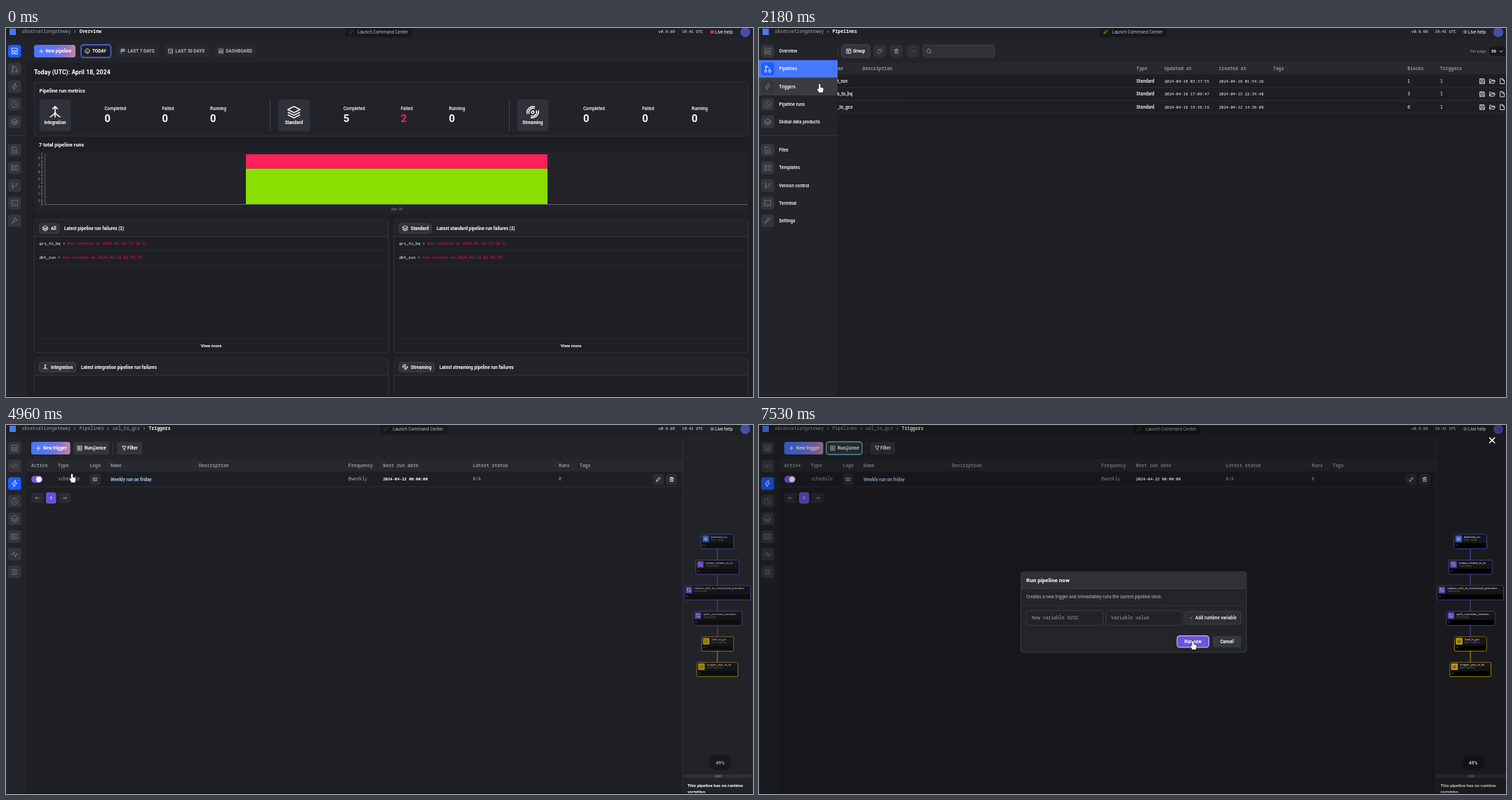
Animation, 1065 px wide and 526 px high, one loop 8 s. Source, as an HTML page with a canvas:

```html
<!DOCTYPE html>
<html lang="en">
<head>
<meta charset="utf-8">
<title>Pipeline dashboard</title>
<style>
html, body { margin: 0; width: 100%; height: 100%; overflow: hidden; background: #1e1f24; }
canvas { display: block; width: 1065px; height: 526px; }
</style>
</head>
<body>
<canvas id="stage" width="1065" height="526"></canvas>
<script>
const ctx = document.getElementById('stage').getContext('2d');
const LOOP = 8000;
const SANS = 'Roboto, "Open Sans", sans-serif';
const MONO = '"Noto Sans Mono", "DejaVu Sans Mono", monospace';
const BODY = '#1e1f24', PANEL = '#232429', BTN = '#33353a', SOFT = '#2a2c31', EDGE = '#35373d';
const BLUE = '#4877ff', PURPLE = '#6b50d7', GREEN = '#8ade00', RED = '#ff1f5a', YELLOW = '#ffcc19';
const WHITE = '#fff', GREY = '#a3a6ad', DIM = '#72757c';

const ICONS = {
  overview: 'M2 2h12v5H2zM2 9.5h4.5V14H2zM9 9.5h5V14H9z',
  pipes: 'M3 1.5h4v4H3zM2 11h4v4H2zM10.5 11h4v4h-4zM4.5 5.5V11M7 4q5.500 0 5.500 7',
  bolt: 'M10 1L3 9h4l-1 6 7-8H9z',
  clock: 'M8 1.500a6.500 6.500 0 1 0 .01 0M8 4v4.500l3 1.500',
  cube: 'M8 1.500l6 3.500v6l-6 3.500-6-3.500V5zM2 5l6 3.500L14 5M2 11l6-2.500 6 2.500M8 8.500v6',
  doc: 'M3 1.500h7l3 3v10H3zM5.500 8h5M5.500 11h5',
  tmpl: 'M1.500 2.500h5v4h-5zM1.500 9.500h5v4h-5zM10 2.500h4v11h-4z',
  branch: 'M4 2v12M2 12l2 2 2-2M4 10h6q2 0 2-2V4M10 5.500l2-2 2 2',
  term: 'M1.500 2.500h13v11h-13zM4 6l2.500 2L4 10M8 10.500h3',
  wrench: 'M13.500 4.500a4 4 0 0 1-5.500 4l-4.500 5L2 12l5-4.500a4 4 0 0 1 4-5.500L9.500 4.500l2 2z',
  code: 'M5 4L1 8l4 4M11 4l4 4-4 4M9.500 3l-3 10',
  ball: 'M8 1.500a6.500 6.500 0 1 0 .01 0M2 6.500q6 4 12 1M3 11q5-1 9 2',
  log: 'M1.500 3h13v10h-13zM5.500 3v10M8 6.500h4M8 9.500h4M3 6h1M3 9h1',
  pulse: 'M1 9h3l2-6 3.500 11L12 7l1 2h2',
  sliders: 'M1.500 3.500h13M1.500 8h13M1.500 12.500h13M5 2v3M11 6.500v3M6 11v3',
  smile: 'M8 1.500a6.500 6.500 0 1 0 .01 0M5 9.500q3 3 6 0M5.500 6v1M10.500 6v1',
  flag: 'M3 15V2h10v7H3M6 2v7M10 2v7M3 5.500h10',
  month: 'M2 2h12v12H2zM2 6h12M7 11h7',
  merge: 'M8 14V1.500M5 4.500l3-3 3 3M8 8Q7 11 2 13.500M8 8q1 3 6 5.500',
  layers: 'M8 1.500L15 5 8 8.500 1 5zM1 8l7 3.500L15 8M1 11l7 3.500 7-3.500',
  stream: 'M8 6.500a1.500 1.500 0 1 0 .01 0M4 10a4.500 4.500 0 0 1 6-6M12 6a4.500 4.500 0 0 1-6 6M1.500 10a7 7 0 0 1 9-8M14.500 6a7 7 0 0 1-9 8',
  plus: 'M8 2v12M2 8h12',
  filter: 'M2 2.500h12l-4.500 5.500v5.500l-3-2V8z',
  group: 'M2 2h12v12H2zM2 6h12M7 6v8',
  copy: 'M2 5h8v9H2zM6 5V2h8v8h-4',
  trash: 'M2 4h12M4 4v10h8V4M6 4V2h4v2M6.700 7v4M9.300 7v4',
  dots: 'M2 8h1.500M7.300 8h1.500M12.500 8H14',
  search: 'M7 2a5 5 0 1 0 .01 0M10.500 10.500L14 14',
  save: 'M2 2h10l2 2v10H2zM5 2v4h6V2M4.500 14V9.500h7V14',
  folder: 'M1.500 13V3h4l2 2h6v2.500M1.500 13l3-5.500h11l-3 5.500z',
  page: 'M3 1.500h6l4.500 4.500v8.500H3zM9 1.500V6h4.500',
  left: 'M14 8H2M6 4L2 8l4 4', right: 'M2 8h12M10 4l4 4-4 4',
  down: 'M3 6l5 5 5-5', chev: 'M6 3l5 5-5 5',
  pause: 'M5 2v12M11 2v12',
  edit: 'M2.500 13.500l1-4 7-7 3 3-7 7z',
  run: 'M2 2h12v12H2zM6 5v6l5-3z',
  block: 'M3 3h10v10H3zM1.500 3h3M11.500 13h3M3 1.500v3M13 11.500v3',
  rocket: 'M2.500 13.500l2.500-6q3-6 9-5.500 0 6-5.500 9zM5 8l3 3',
  cross: 'M2 2l12 12M14 2L2 14'
};
const HAND = new Path2D('M-1.2 .9a1.200 1.200 0 0 1 2.400 0V4.600l3 .6q1.300.3 1.200 1.600l-.5 3.200-.6 2h-5L-3.400 7.600q-.6-1.200.8-1.200l1.400 1z');
const ARROW = new Path2D('M0 0v9l2-1.800 1.400 3 1.500-.7-1.400-2.900H6.300z');
for (const k in ICONS) ICONS[k] = new Path2D(ICONS[k]);

function box(x, y, w, h, r, fill, stroke, lw = 0.9) {
  ctx.beginPath();
  ctx.roundRect(x, y, w, h, r);
  if (fill) { ctx.fillStyle = fill; ctx.fill(); }
  if (stroke) { ctx.strokeStyle = stroke; ctx.lineWidth = lw; ctx.stroke(); }
}
function line(x1, y1, x2, y2, color = EDGE, lw = 0.9) {
  ctx.strokeStyle = color; ctx.lineWidth = lw;
  ctx.beginPath(); ctx.moveTo(x1, y1); ctx.lineTo(x2, y2); ctx.stroke();
}
function dot(x, y, r, color) {
  ctx.fillStyle = color;
  ctx.beginPath(); ctx.arc(x, y, r, 0, 7); ctx.fill();
}
// y is the middle of the capitals; the tenfold font keeps small advances precise
function text(s, x, y, size = 6.35, color = WHITE, weight = 700, align = 'left', font = SANS) {
  ctx.save();
  ctx.translate(x, y + size * 0.36);
  ctx.scale(0.1, 0.1);
  ctx.font = `${weight} ${size * 10}px ${font}`;
  ctx.textAlign = align; ctx.fillStyle = color;
  ctx.fillText(s, 0, 0);
  ctx.restore();
}
function mono(s, x, y, size = 6.47, color = WHITE, weight = 500) {
  text(s, x, y, size, color, weight, 'left', MONO);
}
function icon(name, cx, cy, size, color = WHITE, lw = 0.8) {
  ctx.save();
  ctx.translate(cx - size / 2, cy - size / 2);
  ctx.scale(size / 16, size / 16);
  ctx.strokeStyle = color; ctx.lineWidth = lw * 16 / size;
  ctx.lineJoin = 'round';
  ctx.stroke(ICONS[name]);
  ctx.restore();
}
function button(x, w, name, ix, label, tx, fill = BTN, color = WHITE, stroke) {
  box(x, 24, w, 18, 3.5, fill, stroke, 1.3);
  icon(name, ix, 33, 8, color);
  if (label) text(label, tx, 33, 6.35, color);
}
function warmButton(x, w, label, tx) {
  const g = ctx.createLinearGradient(x, 0, x + w, 0);
  g.addColorStop(0, BLUE); g.addColorStop(0.45, '#5f76f0');
  g.addColorStop(0.8, '#9a74c4'); g.addColorStop(1, '#c08c9c');
  button(x, w, 'plus', x + 10.3, label, tx, g);
}

// ---- overview page
function stats(x, name, ic, cols, vals) {
  box(x, 102, 45, 45, 4, '#2f3238');
  icon(ic, x + 22.5, 120, 20, WHITE, 1.5);
  text(name, x + 22.5, 135, 6.3, WHITE, 700, 'center');
  ['Completed', 'Failed', 'Running'].forEach((s, i) => {
    text(s, cols[i], 115, 6.3, WHITE, 500);
    text(vals[i], cols[i], 128.5, 14.8, vals[i] === '2' ? RED : WHITE);
  });
}
function failures(x, y, chip, ic, chipW, title, rows) {
  box(x, y, 505.5, 190, 4, '#1f2024', EDGE);
  box(x + 0.5, y + 0.5, 504.5, 24, [4, 4, 0, 0], PANEL);
  line(x, y + 24.5, x + 505.5, y + 24.5);
  box(x + 7.5, y + 6, chipW, 13.5, 3, '#2f3238', '#44474d');
  icon(ic, x + 16, y + 12.6, 9);
  text(chip, x + 24, y + 12.6);
  text(title, x + chipW + 15, y + 12.6, 6.3);
  rows.forEach(([name, date], i) => {
    const ry = y + 34 + i * 19.7;
    mono(name + ' >', x + 7.5, ry, 5.57);
    mono('Run created on ' + date, x + 7.5 + (name.length + 3) * 3.34, ry, 5.57, '#dc1a49');
    line(x, ry + 10, x + 505.5, ry + 10, '#292b30');
  });
  if (rows.length) {
    line(x, y + 169.5, x + 505.5, y + 169.5, '#292b30');
    text('View more', x + 252.500, y + 180, 6.2, WHITE, 700, 'center');
  }
}
function overview() {
  warmButton(40, 59, 'New pipeline', 56.3);
  button(107, 42.5, 'smile', 116, 'TODAY', 123, BODY, WHITE, BLUE);
  const c = '#b5b7bc', f = '#27292e';
  button(158, 59, 'flag', 166.500, 'LAST 7 DAYS', 173.5, f, c);
  button(226, 64, 'month', 234.500, 'LAST 30 DAYS', 241.5, f, c);
  button(298, 58, 'overview', 306.5, 'DASHBOARD', 313.5, f, c);
  text('Today (UTC): April 18, 2024', 40, 62.5, 8.8);

  box(40, 77, 1018, 77, 4, '#222328', EDGE);
  text('Pipeline run metrics', 47.5, 89.5, 7.2);
  stats(47.5, 'Integration', 'merge', [140.5, 222.5, 291], ['0', '0', '0']);
  stats(388, 'Standard', 'layers', [481, 563, 631.5], ['5', '2', '0']);
  stats(728.5, 'Streaming', 'stream', [823, 907, 977.5], ['0', '0', '0']);
  for (const x of [376.5, 717.5]) line(x, 102, x, 147, '#44464c');

  text('7 total pipeline runs', 47, 166.5, 7.2);
  box(40, 176, 1018, 89, 4, '#222328');
  for (let i = 0; i <= 14; i++) {
    const y = 251.3 - i * 5.1;
    if (i) line(56, y, 1058, y, '#27292e', 0.7);
    text(String(i / 2), 52.500, y, 4.8, '#9b9ea5', 400, 'right');
  }
  line(55.5, 179, 55.5, 251.5, '#63666d');
  box(342, 180, 430, 20.5, 0, RED);
  box(342, 200.5, 430, 51, 0, GREEN);
  line(55, 251.5, 1058, 251.5, '#63666d');
  text('Apr 18', 557, 258.500, 5.4, '#8b8e95', 400, 'center');

  const runs = [['gcs_to_bq', '2024-04-18 13:20:31'], ['dbt_run', '2024-04-18 02:09:58']];
  failures(40, 273, 'All', 'cube', 28, 'Latest pipeline run failures (2)', runs);
  failures(553, 273, 'Standard', 'layers', 46, 'Latest standard pipeline run failures (2)', runs);
  failures(40, 470.7, 'Integration', 'merge', 52, 'Latest integration pipeline run failures', []);
  failures(553, 470.7, 'Streaming', 'stream', 50, 'Latest streaming pipeline run failures', []);
}

// ---- tables
function heads(y, list) {
  for (const [s, x] of list) mono(s, x, y, 6.47, '#8f9299', 600);
}
function pager(y) {
  box(36, y - 7.500, 17.5, 15, 3, SOFT);
  box(57, y - 8, 14.5, 16, 3, PURPLE);
  box(75, y - 7.500, 17.500, 15, 3, SOFT);
  icon('left', 44.7, y, 7, GREY);
  icon('right', 83.700, y, 7, GREY);
  text('1', 64.2, y, 6, WHITE, 700, 'center');
}
function pipelines(t) {
  warmButton(36, 35.5, 'New', 53);
  button(77, 36, 'filter', 86, 'Filter', 91.5);
  button(118, 40, 'group', 128, 'Group', 134, BTN, WHITE, '#404248');
  button(163, 18, 'copy', 172, '', 0, '#2e3035', DIM);
  button(187, 18, 'trash', 195.8, '', 0, '#2e3035', GREY);
  button(211, 17.5, 'dots', 219.700, '', 0, '#2e3035', GREY);
  box(234, 24.3, 102, 17.5, 3.5, '#2f3136', '#404349');
  icon('search', 242.500, 33.2, 9, GREY);
  text('Per page', 1014, 33, 5.6, '#92959c', 400);
  box(1040, 25, 25, 16, 3, '#18191d', EDGE);
  text('30', 1044, 33, 6);
  icon('down', 1058, 33, 7);

  box(29, 49, 1036, 17, 0, '#27292e');
  heads(57.5, [['Status', 57.5], ['Name', 104.5], ['Description', 147.5], ['Type', 538],
    ['Updated at', 578], ['Created at', 655.7], ['Tags', 733], ['Blocks', 924.5], ['Triggers', 971]]);
  [['dbt_run', '18 03:37:55', '18 01:54:26', '1'], ['gcs_to_bq', '18 17:09:47', '15 22:34:48', '3'],
    ['url_to_gcs', '18 19:36:19', '12 14:39:08', '6']].forEach(([name, upd, made, n], i) => {
    const y = 75.500 + i * 18.5;
    icon('pause', 40, y, 8.5, GREY, 1.5);
    mono('active', 57.5, y, 6.47, '#2a9a12');
    text(name, 104.5, y, 6.35, WHITE, 500);
    text('Standard', 538, y, 6.35, WHITE, 500);
    mono('2024-04-' + upd, 578, y, 5.6);
    mono('2024-04-' + made, 655.7, y, 5.6);
    mono(n, 924.5, y);
    mono('1', 971, y);
    icon('save', 1031, y + 0.3, 9); icon('folder', 1045.3, y + 0.3, 9); icon('page', 1059.500, y + 0.3, 9);
    line(29, y + 9.3, 1065, y + 9.3, '#303238');
  });
  if (t > 3450) line(104.5, 115.6, 133, 115.6, WHITE, 0.8);
  pager(137.5);
}
function node(x, y, w, color, ic, name, kind) {
  box(x, y, w, 20.3, 1.5, '#000', color, 0.8);
  box(x + 0.5, y + 0.5, w - 1, 12, 0, '#1b1c20');
  box(x + 1.8, y + 1.5, 9.500, 9.5, 1.3, color);
  icon(ic, x + 6.5, y + 6.2, 6, color === YELLOW ? '#6a5200' : WHITE, 0.6);
  mono(name, x + 14.3, y + 4, 3.2, WHITE, 700);
  mono(kind, x + 14.3, y + 8, 2.8, GREY, 400);
  mono('PY', x + 2.300, y + 16.300, 2.800, GREY);
}
function diagram() {
  const violet = '#7d55ec';
  [BLUE, violet, violet, violet, YELLOW].forEach((c, i) =>
    line(1014.2, 176 + i * 36.5, 1014.2, 192.5 + i * 36.5, c, 1));
  const tf = 'Transformer', ex = 'Data exporter';
  node(991, 156, 46.5, BLUE, 'cube', 'download_csv', 'Data loader');
  node(983.500, 192.500, 61.5, violet, 'block', 'rename_columns_to_en', tf);
  node(967, 229, 94.5, violet, 'block', 'replace_null_in_centralized_procedure', tf);
  node(980, 265.500, 69, violet, 'block', 'split_execution_location', tf);
  node(991.7, 302, 45.500, YELLOW, 'cube', 'load_to_gcs', ex);
  node(985, 338.3, 58.500, YELLOW, 'cube', 'trigger_pipe_to_bq', ex);
  text('49%', 1018.2, 481.2, 6.6, WHITE, 700, 'center');
}
function triggers(t) {
  warmButton(36, 55.5, 'New trigger', 53);
  button(96, 51, 'run', 105, 'Run@once', 112, t > 5570 && t < 6050 ? '#4b4d52' : BTN, WHITE, t > 6050 ? '#5cc3cf' : '');
  line(152.5, 24, 152.5, 42, '#3a3c42');
  button(158, 36, 'filter', 168.500, 'Filter', 173);

  box(29, 49, 936, 17.500, 0, '#27292e');
  heads(58, [['Active', 36], ['Type', 74], ['Logs', 119.500], ['Name', 149], ['Description', 275],
    ['Frequency', 488], ['Next run date', 537.500], ['Latest status', 665.500], ['Runs', 788], ['Tags', 818]]);
  box(36, 72.5, 16, 10, 5, '#7d55ec');
  dot(47, 77.5, 4, WHITE);
  mono('schedule', 74, 77, 6.47, GREY);
  box(120, 70.500, 14, 14, 3, SOFT, EDGE);
  icon('log', 127, 77.5, 7, GREY);
  text('Weekly run on friday', 149, 77.500, 6.4, '#a9c8f5');
  mono('@weekly', 488, 77, 6.47, GREY);
  mono('2024-04-22 00:00:00', 537.500, 77, 5.6, WHITE, 600);
  mono('N/A', 665.5, 77, 6.47, GREY);
  mono('0', 788, 77, 6.47, GREY);
  for (const [x, n] of [[923, 'edit'], [942, 'trash']]) {
    box(x, 70.5, 14, 14, 3, SOFT, EDGE);
    icon(n, x + 7, 77.5, 8);
  }
  line(29, 88, 965, 88, '#303238');
  pager(104);

  box(965, 16, 100, 510, 0, '#222328');
  line(965, 16, 965, 526, '#2f3137');
  box(1002, 470.500, 32.500, 21.500, 10.500, '#18191d');
  box(965, 498, 100, 5, 0, '#2f3136');
  box(1011, 498.500, 9, 4, 1, '#505359');
  text('This pipeline has no runtime', 971.5, 514, 6.2);
  text('variables.', 971.5, 523, 6.2);
  ctx.globalAlpha = Math.min(1, Math.max(0, (t - 4690) / 450));
  if (ctx.globalAlpha > 0) diagram();
  ctx.globalAlpha = 1;
}

// ---- frame parts
const MENU = [['overview', 'Overview'], ['pipes', 'Pipelines'], ['bolt', 'Triggers'], ['clock', 'Pipeline runs'],
  ['cube', 'Global data products'], ['doc', 'Files'], ['tmpl', 'Templates'], ['branch', 'Version control'],
  ['term', 'Terminal'], ['wrench', 'Settings']];
const SUBMENU = ['overview', 'code', 'bolt', 'clock', 'ball', 'log', 'pulse', 'sliders'];

function menuWidth(t) {
  if (t < 1010) return 29;
  if (t < 2250) return 112 - 16 * Math.exp((1010 - t) / 60);
  return 29 + 83 * Math.exp((2250 - t) / 60);
}
function sidebar(t, page, cur) {
  const w = menuWidth(t), open = w > 34;
  box(0, 16, w, 510, 0, PANEL);
  ctx.save();
  ctx.beginPath(); ctx.rect(0, 16, w, 510); ctx.clip();
  const items = page === 2 ? SUBMENU.map(n => [n, '']) : MENU;
  items.forEach(([name, label], i) => {
    const y = 33 + i * 25.2 + (page < 2 && i > 4 ? 15 : 0), on = i === page;
    if (open && on) box(0, y - 12.500, w, 25, 0, BLUE);
    else if (open && cur && cur[0] < w && Math.abs(cur[1] - y) < 12.5) box(0, y - 12.500, w, 25, 0, '#3a3c40');
    box(3, y - 9, 18.500, 18, 3.500, on ? '#1f5bff' : '#34363b');
    icon(name, 12.2, y, 11, on ? WHITE : '#7b7e85');
    if (open) text(label, 28.5, y, 6.3, WHITE, 500);
  });
  if (page < 2) line(0, 153.5, w, 153.5, EDGE);
  ctx.restore();
}
const TRAILS = [['Overview'], ['Pipelines'], ['Pipelines', 'url_to_gcs', 'Triggers']];
function topbar(page) {
  box(0, 0, 1065, 16, 0, '#202126');
  box(5, 1, 9, 9, 0, BLUE);
  let x = 22.5;
  ['observationgateway', ...TRAILS[page]].forEach((s, i, all) => {
    const last = i === all.length - 1;
    mono(s, x, 5, 6.47, last ? WHITE : GREY, last ? 700 : 500);
    x += s.length * 3.88 + 12.5;
    if (!last) icon('chev', x - 6.700, 5, 5.5, GREY);
  });
  const lx = [483, 485, 533][page];
  box(lx, -5, 96, 18, 4, '#17181c');
  icon('rocket', lx + 9, 5.800, 7, page === 1 ? '#5fae1c' : '#3b4331');
  text('Launch Command Center', lx + 18.2, 5.8, 6.37, '#b4b6bb', 400);
  mono('v0.9.69', 930, 5, 5.65);
  mono('19:41 UTC', 963.5, 5, 5.65);
  dot(1006.800, 5.5, 2.6, page ? '#6d7078' : '#d0315f');
  text('Live help', 1011, 5.8, 6.4, WHITE, 400);
  dot(1054, 6, 7, '#4450a8');
}
function modal(a) {
  ctx.globalAlpha = a;
  box(0, 0, 1065, 526, 0, 'rgba(0,0,0,.25)');
  icon('cross', 1045.2, 21.8, 10.5, WHITE, 1.5);
  box(373.5, 209.5, 321.5, 114.5, 4, '#232529', '#3f4248');
  box(374, 210, 320.5, 23, [4, 4, 0, 0], '#2e3136');
  line(373.5, 233.3, 695, 233.3, '#3f4248');
  text('Run pipeline now', 381, 221.5, 8.05);
  text('Creates a new trigger and immediately runs the current pipeline once.', 381, 245.2, 6.3, '#b8bbc1', 400);
  line(373.5, 257.5, 695, 257.5, '#2d3035');
  box(381, 264.500, 109.500, 21, 3.5, '#212327', '#3d4046');
  box(494.5, 264.5, 109.5, 21, 3.5, '#212327', '#3d4046');
  mono('New variable UUID', 389, 274.500, 6.47, '#9fa2a9');
  mono('Variable value', 502, 274.5, 6.47, '#9fa2a9');
  box(607.5, 266, 79.5, 18, 3.5, '#2c2e33', '#44474d');
  icon('plus', 616, 275, 4.500, DIM);
  text('Add runtime variable', 622, 275, 6.3, '#e4e5e8');
}
function modalButtons(t) {
  box(596, 300.5, 45.5, 16.500, 3.500, t > 7390 ? '#6f52dc' : PURPLE, t > 7390 ? '#d9d4f5' : '', 1);
  text('Run now', 618.700, 309, 6.35, WHITE, 700, 'center');
  box(647, 300.5, 40.500, 16.5, 3.5, '#35383d');
  text('Cancel', 667.200, 309, 6.35, WHITE, 700, 'center');
  ctx.globalAlpha = 1;
}

// ---- pointer: time, x, y
const PATH = [[160, 1004, 514], [810, 14.5, 61], [2040, 14.5, 61], [2180, 86, 80], [2400, 165, 104],
  [2780, 139, 121], [2850, 139, 121], [3210, 121, 118], [3410, 121, 118], [3550, 121, 115], [4690, 121, 115],
  [4960, 94, 70], [5430, 117, 50], [5500, 117, 50], [5640, 116.5, 33.5], [6080, 116.5, 33.5],
  [6470, 385, 267], [6620, 385, 267], [7150, 590, 280], [7390, 618.5, 308], [8000, 618.5, 308]];

function slope(i, k) {
  const a = PATH[i - 1], p = PATH[i], b = PATH[i + 1];
  if (!a || !b || a[k] === p[k] || b[k] === p[k]) return 0;
  return (b[k] - a[k]) / (b[0] - a[0]);
}
function pointer(t) {
  if (t < PATH[0][0]) return null;
  const i = PATH.findIndex((p, n) => n && t <= p[0]);
  const a = PATH[i - 1], b = PATH[i], d = b[0] - a[0], u = (t - a[0]) / d;
  const s = u * u * (3 - 2 * u);
  return [1, 2].map(k => a[k] + (b[k] - a[k]) * s +
    d * (slope(i - 1, k) * u * (1 - u) ** 2 - slope(i, k) * u * u * (1 - u)));
}
const within = (t, spans) => spans.some(([a, b]) => t >= a && t < b);
const CLICKS = [[1490, 1560], [4340, 4410], [5910, 6050]];
const HANDS = [[1080, 2260], [3450, 4480], [4880, 5080], [5500, 6080], [7390, LOOP]];

function drawPointer(t, [x, y]) {
  if (within(t, CLICKS)) dot(x - 0.7, y + 0.8, 6.5, 'rgba(212,196,0,.82)');
  const shape = within(t, HANDS) ? HAND : ARROW;
  ctx.save();
  ctx.translate(x, y);
  ctx.lineJoin = 'round';
  ctx.strokeStyle = '#111'; ctx.lineWidth = 1.2;
  ctx.stroke(shape);
  ctx.fillStyle = WHITE;
  ctx.fill(shape);
  ctx.restore();
}

function draw(t) {
  const page = t < 1560 ? 0 : t < 4410 ? 1 : 2, cur = pointer(t);
  box(0, 0, 1065, 526, 0, BODY);
  box(0, 16, 1065, 33, 0, PANEL);
  [overview, pipelines, triggers][page](t);
  sidebar(t, page, cur);
  topbar(page);
  box(0, 524.5, 1065, 1.5, 0, '#17181b');
  if (t > 6120) {
    modal(Math.min(1, (t - 6120) / 140));
    modalButtons(t);
  }
  if (cur) drawPointer(t, cur);
}
function tick() {
  draw(performance.now() % LOOP);
  requestAnimationFrame(tick);
}
tick();
</script>
</body>
</html>
```
